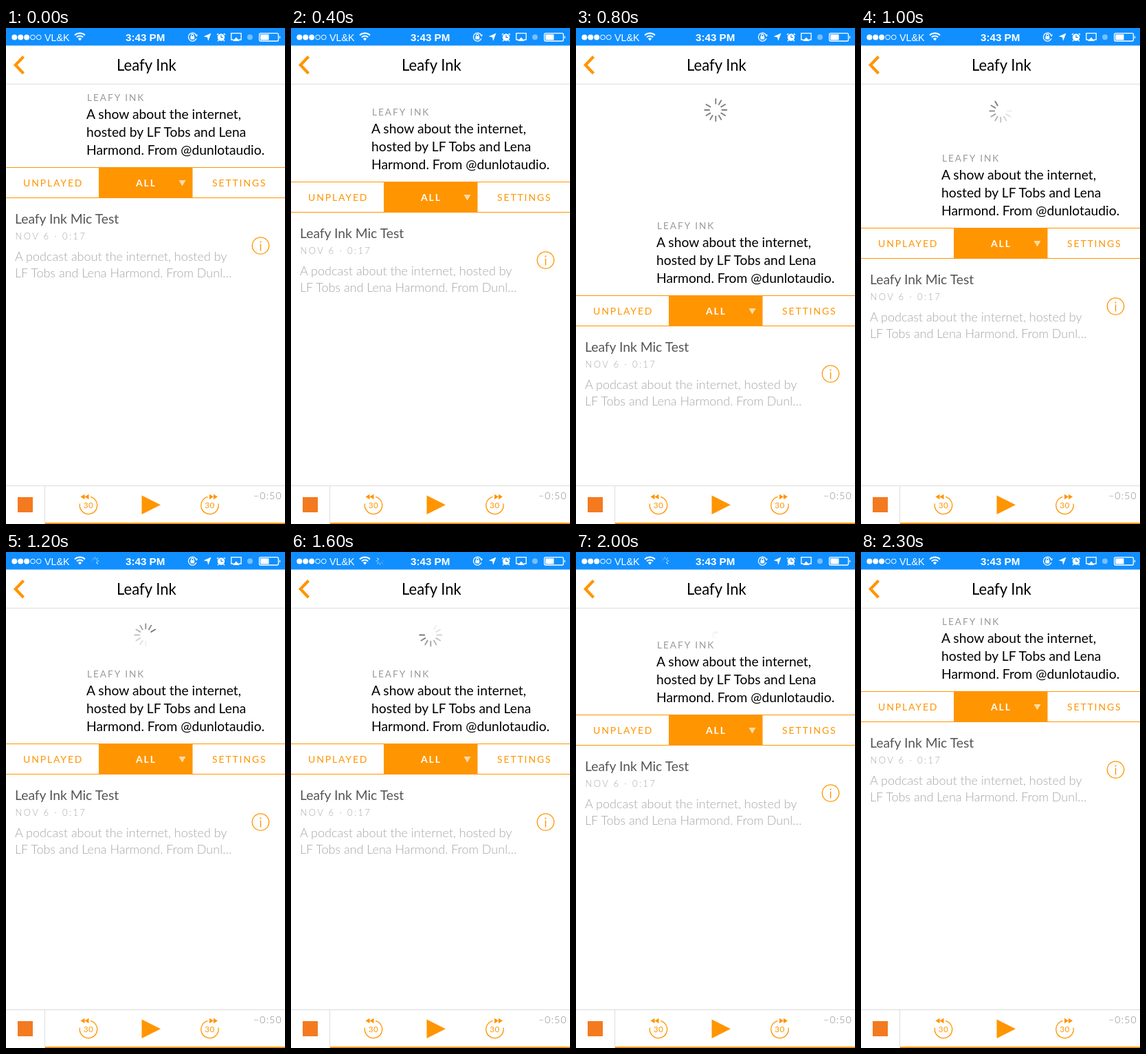
Write an HTML page that moves like this. It is 406x720 px and loops after 2.4 s.

```html
<!DOCTYPE html>
<html lang="en">
<head>
<meta charset="utf-8">
<title>Pull to refresh</title>
<style>
  html, body { margin: 0; width: 100%; height: 100%; overflow: hidden; background: #fff; }
  svg { display: block; width: 100vw; height: 100vh; font-family: Lato, "Open Sans", sans-serif; }
  .status { font-family: "Liberation Sans", Arial, sans-serif; fill: #fff; }
  .title { font-size: 22.1px; }
  .about { font-size: 19.3px; }
  .label { font-size: 13.6px; letter-spacing: 2px; fill: #999; }
  .tab { font-size: 14px; letter-spacing: 1.85px; fill: #ff9500; }
  .episode { font-size: 19.3px; fill: #555; }
  .date { font-size: 13px; font-weight: 300; letter-spacing: 2.4px; fill: #aaa; }
  .notes { font-size: 18px; font-weight: 300; fill: #a6a6a6; }
  .left { font-size: 14px; font-weight: 300; letter-spacing: 1.2px; fill: #888; }
  .skip { font-size: 11.8px; letter-spacing: .4px; text-anchor: middle; }
  .orange { fill: #ff9500; }
  .line { fill: none; stroke: #ff9500; }
  .white { fill: none; stroke: #fff; }
</style>
</head>
<body>
<svg viewBox="0 0 406 720" preserveAspectRatio="none">
  <rect width="406" height="720" fill="#fff"/>

  <g id="spinner" stroke="#555" stroke-width="1.9" stroke-linecap="round"></g>

  <g id="content">
    <text class="label" x="118" y="106">LEAFY INK</text>
    <g class="about">
      <text x="117" y="131.5">A show about the internet,</text>
      <text x="117" y="157.5">hosted by LF Tobs and Lena</text>
      <text x="117" y="183.5">Harmond. From @dunlotaudio.</text>
    </g>

    <rect class="orange" x="135" y="202" width="136.5" height="45"/>
    <path class="line" stroke-width="1.2" d="M0 202.5H406M0 246.5H406"/>
    <text class="tab" x="25" y="230">UNPLAYED</text>
    <text class="tab" x="189" y="230" style="fill:#fff;font-weight:700">ALL</text>
    <text class="tab" x="300" y="230">SETTINGS</text>
    <path fill="#ffdca8" d="M251.5 221h10l-5 8.5z"/>

    <text class="episode" x="13" y="284">Leafy Ink Mic Test</text>
    <text class="date" x="13.5" y="307">NOV 6 · 0:17</text>
    <g class="notes">
      <text x="13" y="338">A podcast about the internet, hosted by</text>
      <text x="13" y="362">LF Tobs and Lena Harmond. From Dunl…</text>
    </g>
    <circle class="line" cx="370.5" cy="316" r="12.2" stroke-width="1.3"/>
    <circle class="orange" cx="370.5" cy="310.5" r="1.1"/>
    <path class="line" stroke-width="1.4" d="M370.5 313.5V323.5"/>
  </g>

  <!-- Navigation bar -->
  <rect y="25" width="406" height="56" fill="#fff"/>
  <path d="M0 81.5H406" stroke="#ddd"/>
  <path class="line" stroke-width="4.2" d="M25.5 41.5L13.8 53.7L25.5 66"/>
  <text class="title" x="161" y="61.5">Leafy Ink</text>

  <!-- Status bar -->
  <rect width="406" height="25.5" fill="#118fff"/>
  <g class="status">
    <circle cx="12.3" cy="13.5" r="4"/>
    <circle cx="21.2" cy="13.5" r="4"/>
    <circle cx="30.1" cy="13.5" r="4"/>
    <circle class="white" cx="39" cy="13.5" r="3.4"/>
    <circle class="white" cx="47.7" cy="13.5" r="3.4"/>
    <text x="56" y="18.5" font-size="14.3">VL&amp;K</text>
    <text x="174" y="18.5" font-size="15.2" font-weight="700">3:43 PM</text>
    <path d="M107.5 18.5l-2.6-3a3.8 3.8 0 0 1 5.2 0z"/>
    <path class="white" stroke-width="1.9" d="M102.8 13.4a6.8 6.8 0 0 1 9.4 0M100 10.5a10.8 10.8 0 0 1 15 0"/>
  </g>
  <g id="network" stroke="#fff" stroke-width="1.2" stroke-linecap="round"></g>
  <g class="white" stroke-width="1.3">
    <path d="M276.8 10.4A6 6 0 1 0 277 15.3M269.6 12v-1.3a1.7 1.7 0 0 1 3.4 0V12"/>
    <path d="M331.5 17h-3.7V7.6h14.4V17h-3.7"/>
    <path d="M309 8l-2 2M317 8l2 2M309.5 17.5l-1.5 1.7M316.5 17.5l1.5 1.7"/>
    <rect x="368.6" y="7.6" width="27.8" height="11.4" rx="2"/>
  </g>
  <g fill="#fff">
    <rect x="268.4" y="12" width="5.8" height="4.4" rx=".6"/>
    <path d="M275.2 9.8h4l-2 3.2z"/>
    <path d="M298.5 7.5l-4.2 11.3l-1.3-5.3l-5.3-1.2z"/>
    <circle cx="313" cy="13.5" r="5.2"/>
    <path d="M335 13.5l5 5.5h-10z"/>
    <rect x="370.2" y="9.2" width="12.3" height="8.2" rx=".6"/>
    <path d="M397.8 11.2a2.4 2.4 0 0 1 0 4.4z"/>
  </g>
  <path fill="none" stroke="#118fff" stroke-width="1.2" d="M313 10.2v3.5h2.8"/>
  <circle cx="355" cy="13.3" r="4" fill="#78bfff"/>

  <!-- Player -->
  <rect y="664" width="406" height="56" fill="#fff"/>
  <path d="M0 664.5H406M56.5 664V720" stroke="#ddd" fill="none"/>
  <rect x="17" y="681" width="22" height="22" fill="#f47a20"/>
  <path class="orange" d="M197.5 678.5L225 692.3L197.5 706z"/>
  <g transform="translate(120 693)">
    <path class="line" stroke-width="1.3" d="M3 -12.4A12.7 12.7 0 1 1 -12.5 -2.5"/>
    <path class="orange" d="M-11.5 -12.5l6 -3.8v7.6zM-5.5 -12.5l6 -3.8v7.6z"/>
    <text class="skip orange" y="4.2">30</text>
  </g>
  <g transform="translate(296.5 693)">
    <path class="line" stroke-width="1.3" d="M-3 -12.4A12.7 12.7 0 1 0 12.5 -2.5"/>
    <path class="orange" d="M11.5 -12.5l-6 -3.8v7.6zM5.5 -12.5l-6 -3.8v7.6z"/>
    <text class="skip orange" y="4.2">30</text>
  </g>
  <text class="left" x="360" y="684">−0:50</text>
  <rect class="orange" x="57" y="718" width="349" height="2"/>
</svg>

<script>
  const STEP = 100, STEPS = 24;
  const RELEASE = 9, CLOSE = 18;
  // How far the list is pulled down at each step
  const pull = [0, 0, 3, 10, 21, 36, 52.5, 118, 186, 130, 88, 78,
                76, 76, 76, 76, 76, 76, 76, 62, 34, 14, 4, 0];

  const byId = id => document.getElementById(id);
  const content = byId('content'), spinner = byId('spinner'), network = byId('network');

  function addPetals(group, count, inner, outer) {
    return Array.from({ length: count }, (_, i) => {
      const line = document.createElementNS('http://www.w3.org/2000/svg', 'line');
      line.setAttribute('y1', -inner);
      line.setAttribute('y2', -outer);
      line.setAttribute('transform', `rotate(${i * 360 / count})`);
      group.append(line);
      return line;
    });
  }

  // Petals fade the further they trail behind the head; the last quarter is gone
  function fade(petals, head, strength) {
    const n = petals.length;
    petals.forEach((petal, i) => {
      const behind = (((head - i) % n) + n) % n;
      petal.setAttribute('opacity', strength * Math.max(0, 1 - behind / (n * 0.75)));
    });
  }

  const petals = addPetals(spinner, 12, 9.2, 16);
  const dots = addPetals(network, 8, 3, 5.5);

  function drawSpinner(step) {
    const pulling = step < RELEASE;
    const closing = Math.max(0, step - CLOSE);
    const scale = Math.max(0, 1 - closing * 0.34);
    const turn = pulling ? (step - 8) * 3.5 : closing * 135;
    spinner.setAttribute('transform',
      `translate(203.3 ${pulling ? 119 : 120.5}) rotate(${turn}) scale(${scale})`);
    if (pulling) {
      const shown = Math.max(0, (step - 5) * 4 - 1);
      petals.forEach((petal, i) => petal.setAttribute('opacity', i < shown ? 0.75 : 0));
    } else {
      fade(petals, Math.round(11 + (step - 10) * 10 / 6), 0.8 * scale);
    }
  }

  function drawNetwork(step) {
    network.setAttribute('transform', 'translate(129.5 13)');
    network.setAttribute('visibility', step >= 12 && step <= 21 ? 'visible' : 'hidden');
    fade(dots, step - 9, 0.9);
  }

  function draw() {
    const step = Math.floor(performance.now() / STEP) % STEPS;
    content.setAttribute('transform', `translate(0 ${pull[step]})`);
    drawSpinner(step);
    drawNetwork(step);
    requestAnimationFrame(draw);
  }
  draw();
</script>
</body>
</html>
```
